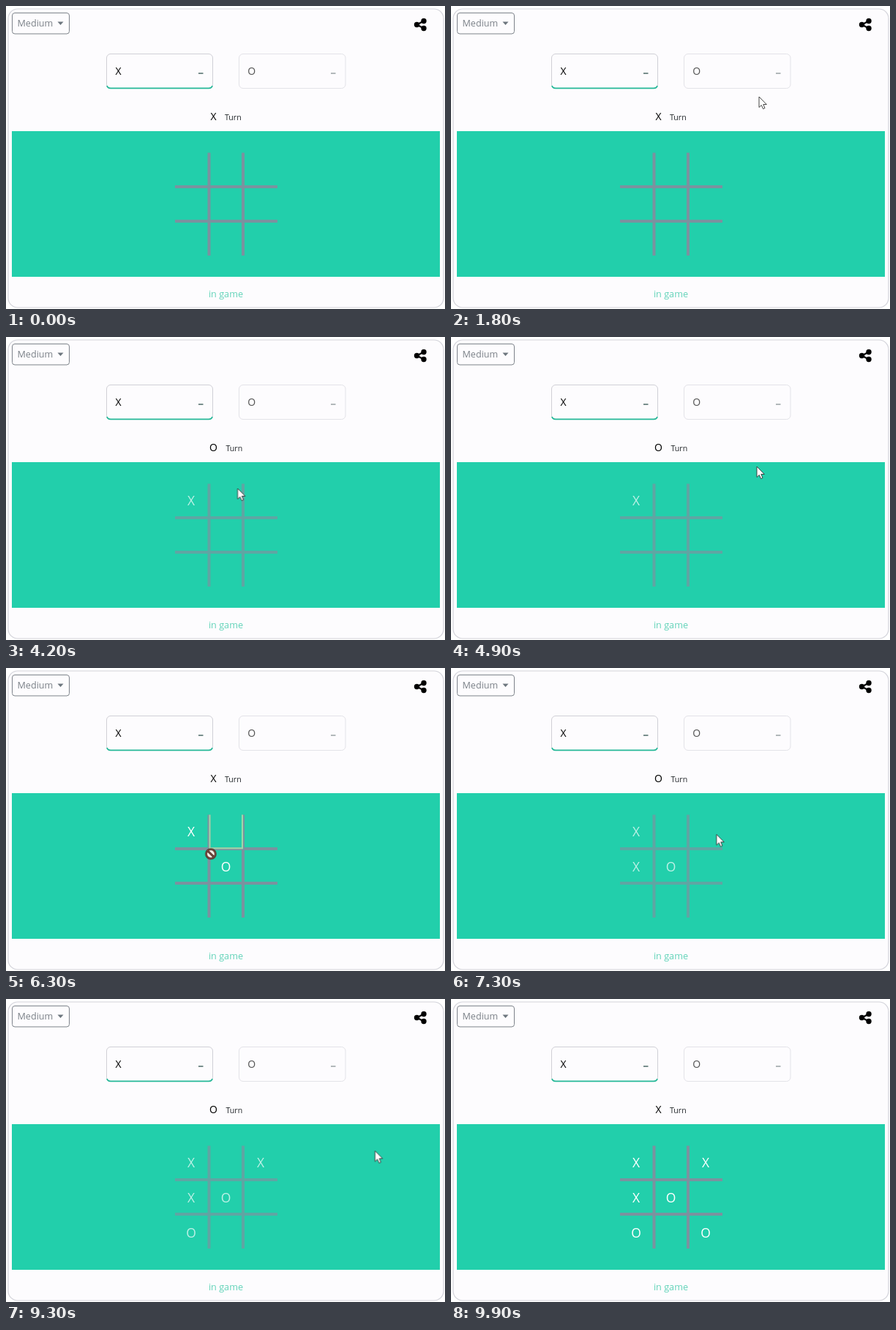
Recreate the animation shown at these times as an HTML page. Size 600x414 px, loop 10 s.

```html
<!DOCTYPE html>
<html lang="en">
<head>
<meta charset="utf-8">
<title>Tic-tac-toe</title>
<style>
  html, body { margin: 0; width: 100%; height: 100%; overflow: hidden; background: #fff; }
  svg { display: block; width: 600px; height: 414px; font-family: "Open Sans", "Noto Sans", sans-serif; }
  .mid { text-anchor: middle; }
  .mark { font-size: 17.5px; fill: #fff; text-anchor: middle; }
  .name { font-size: 14px; font-weight: 500; }
  .grid { stroke: #7b929f; stroke-width: 4; }
  .hover { fill: none; stroke: #a9eaac; stroke-width: 2; }

  /* Everything shares one 10 s clock; on/off parts switch hard. */
  .on { animation: 10s step-end infinite; }
  .flow { animation: 10s linear infinite; }

  @keyframes x1 { 0% { opacity: 0 } 39%, to { opacity: 1 } }
  @keyframes o1 { 0% { opacity: 0 } 50%, to { opacity: 1 } }
  @keyframes x2 { 0% { opacity: 0 } 69%, to { opacity: 1 } }
  @keyframes o2 { 0% { opacity: 0 } 80%, to { opacity: 1 } }
  @keyframes x3 { 0% { opacity: 0 } 87%, to { opacity: 1 } }
  @keyframes o3 { 0% { opacity: 0 } 98%, to { opacity: 1 } }

  @keyframes turnX {
    0%, 50%, 80%, 98%, to { opacity: 1 }
    39%, 69%, 87% { opacity: 0 }
  }
  @keyframes turnO {
    0%, 50%, 80%, 98%, to { opacity: 0 }
    39%, 69%, 87% { opacity: 1 }
  }
  /* The board dims while the opponent thinks. */
  @keyframes dim {
    0%, 39%, 52%, 69%, 82%, 87%, 99%, to { opacity: 1 }
    41%, 50%, 71%, 80%, 89%, 98% { opacity: .7 }
  }

  @keyframes cell1 { 0%, 24% { opacity: 0 } 25%, 39% { opacity: 1 } 40%, to { opacity: 0 } }
  @keyframes cell2 { 0%, 60% { opacity: 0 } 60.8%, 62.7% { opacity: 1 } 64.2%, to { opacity: 0 } }
  @keyframes cell3 {
    0%, 59.4%, 61%, 85%, 88%, to { opacity: 0 }
    60%, 86%, 87% { opacity: 1 }
  }
  @keyframes cell4 { 0%, 64.5% { opacity: 0 } 65.5%, 69% { opacity: 1 } 70%, to { opacity: 0 } }

  @keyframes move {
    0%, 13% { transform: translate(552px, 94px) }
    17% { transform: translate(424px, 122px) }
    18%, 19.5% { transform: translate(421px, 124px) }
    22% { transform: translate(286px, 165px) }
    24.5% { transform: translate(261px, 214px) }
    30% { transform: translate(258px, 223px) }
    38%, 40.5% { transform: translate(255px, 225px) }
    44.5%, 57% { transform: translate(418px, 177px) }
    59.5% { transform: translate(335px, 207px) }
    61% { transform: translate(308px, 225px) }
    63% { transform: translate(280px, 254px) }
    66%, 70% { transform: translate(256px, 268px) }
    74%, 80% { transform: translate(398px, 214px) }
    84% { transform: translate(379px, 213px) }
    86%, 88% { transform: translate(346px, 224px) }
    91% { transform: translate(430px, 215px) }
    95%, to { transform: translate(578px, 200px) }
  }
  @keyframes arrow {
    0%, 24%, 59.4%, 85%, 96%, to { opacity: 0 }
    13%, 39%, 69%, 87% { opacity: 1 }
  }
  @keyframes hand {
    0%, 39%, 62.5%, 69%, 87%, to { opacity: 0 }
    24%, 59.4%, 64.5%, 85% { opacity: 1 }
  }
  @keyframes ban { 0% { opacity: 0 } 62.5% { opacity: 1 } 64.5%, to { opacity: 0 } }
</style>
</head>
<body>
<svg viewBox="0 0 600 414">
  <rect x="3" y="4" width="595" height="408" rx="13" fill="#fdfcfe" stroke="#d3d3da" stroke-width="1.2"/>

  <!-- Level menu and share button -->
  <rect x="8.5" y="9.5" width="78" height="28.5" rx="3.5" fill="none" stroke="#7d838a"/>
  <text x="15.5" y="28" font-size="12.6" fill="#7b8188">Medium</text>
  <path d="M70.5 21.5h8l-4 4.5z" fill="#6c757d"/>
  <g stroke="#000">
    <path d="M571 20.5L561.5 25.5L571 30.5" fill="none" stroke-width="2.2"/>
    <path d="M571 20.5h0M561.5 25.5h0M571 30.5h0" stroke-width="7.4" stroke-linecap="round"/>
  </g>

  <!-- Score cards -->
  <rect x="137.5" y="65.5" width="145" height="47" rx="5.5" fill="none" stroke="#d0d0d6"/>
  <path d="M138 109q1 3.3 5 3.3h134q4 0 5-3.3" fill="none" stroke="#25b898" stroke-width="1.8"/>
  <text class="name" x="149.5" y="94">X</text>
  <path d="M263 92h6.5" stroke="#718886" stroke-width="1.9"/>
  <rect x="318.5" y="65.5" width="145.5" height="47" rx="5.5" fill="none" stroke="#e3e3e8"/>
  <text class="name" x="330.3" y="94" fill="#555">O</text>
  <path d="M444 92h6.5" stroke="#adb5b7" stroke-width="1.9"/>

  <!-- Turn line -->
  <g class="on" style="animation-name:turnX">
    <text class="name mid" x="283.5" y="156">X</text>
    <text x="299" y="155.5" font-size="10.6" fill="#212529">Turn</text>
  </g>
  <g class="on" style="animation-name:turnO">
    <text class="name mid" x="283.5" y="156">O</text>
    <text x="300.5" y="155.5" font-size="10.6" fill="#212529">Turn</text>
  </g>

  <!-- Board -->
  <rect x="8" y="171" width="585" height="199" fill="#22cfab"/>
  <g class="flow" style="animation-name:dim">
    <path class="grid" d="M277.5 200.5v140.5M324 200.5v140.5M231 247h140M231 294h140"/>
    <path class="hover flow" style="animation-name:cell1" d="M276.5 200.5V246.3H231"/>
    <path class="hover flow" style="animation-name:cell2" d="M278.5 200.5V246.3H323V200.5"/>
    <path class="hover flow" style="animation-name:cell3" d="M325 200.5V246.3H371"/>
    <path class="hover flow" style="animation-name:cell4" d="M231 248H276.5V293H231"/>
    <g class="mark">
      <text class="on" style="animation-name:x1" x="253" y="230">X</text>
      <text class="on" style="animation-name:o1" x="300.5" y="278">O</text>
      <text class="on" style="animation-name:x2" x="253" y="278">X</text>
      <text class="on" style="animation-name:o2" x="253" y="325.5">O</text>
      <text class="on" style="animation-name:x3" x="348" y="230">X</text>
      <text class="on" style="animation-name:o3" x="348" y="325.5">O</text>
    </g>
  </g>
  <text class="mid" x="300.5" y="398" font-size="12.7" fill="#62d3b9">in game</text>

  <!-- Pointer, drawn around its hot spot -->
  <g class="flow" style="animation-name:move">
    <path class="on" style="animation-name:arrow" d="M0 0V14.5L3.3 11.5L5.6 16.6L8 15.5L5.8 10.5H10.3Z"
      fill="#fff" stroke="#333" stroke-width=".9"/>
    <g class="on" style="animation-name:hand" fill="#fff" stroke="#333" stroke-width=".9">
      <path d="M-1.5 1.2C-1.5-.7 1.3-.7 1.4 1.2V6.5C2 5.6 4 5.8 4.2 7C5 6.2 6.6 6.5 6.8 7.8C7.8 7.2 9.3 7.8 9.3 9.3V13C9.3 15 8 16 8 18V19.5H0V18C-1.5 16-3.5 13.5-4.6 11.8C-5.4 10-3.6 9.3-2.6 10.6L-1.5 12Z"/>
      <path d="M1.4 6.5V10M4.2 7V10M6.8 7.8V10" fill="none"/>
    </g>
    <g class="on" style="animation-name:ban" fill="none">
      <circle r="6.4" fill="#f4eee6" stroke="#4b2a24" stroke-width="2.8"/>
      <path d="M-4.6-4.6L4.6 4.6" stroke="#4b2a24" stroke-width="2.8"/>
      <path d="M-4.6-4.6L4.6 4.6M-6.4 0a6.4 6.4 0 1 1 12.8 0a6.4 6.4 0 1 1-12.8 0" stroke="#a0675a" stroke-width=".8"/>
    </g>
  </g>
</svg>
</body>
</html>
```
